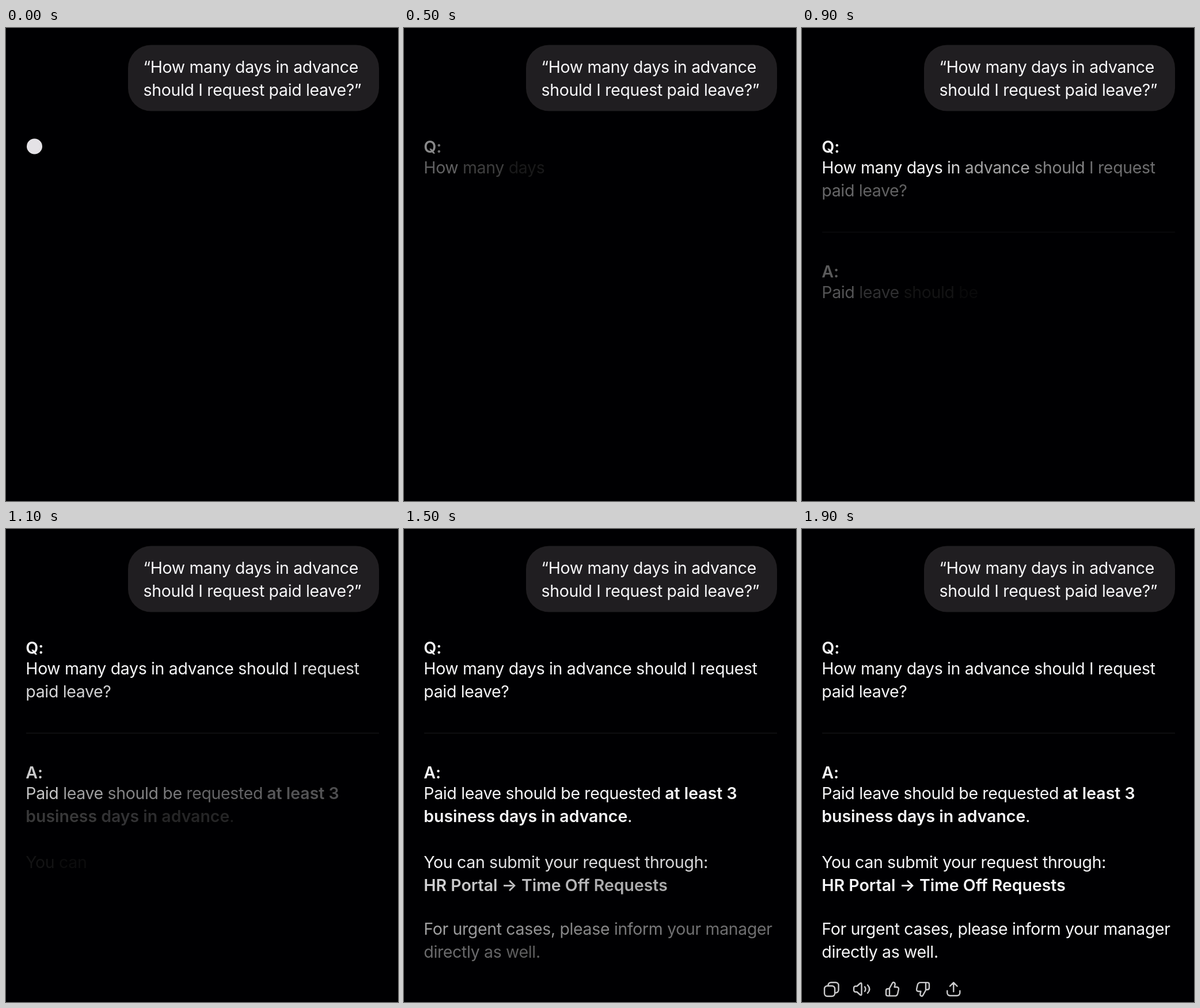
An HTML page that plays this animation: 681x823 px, repeating every 2000 ms.

```html
<!DOCTYPE html>
<html lang="en">
<head>
<meta charset="utf-8">
<title>Paid leave answer</title>
<style>
  html, body { margin: 0; width: 100%; height: 100%; overflow: hidden; background: #000002; }
  svg { display: block; }
  text {
    font: 400 28.5px Inter, "Liberation Sans", sans-serif;
    font-optical-sizing: none;
    letter-spacing: -0.35px;
    white-space: pre;
    fill: #f6f6f8;
  }
  .bold { font-weight: 600; letter-spacing: -0.03px; }
  .icon { fill: none; stroke: #cbcbcd; stroke-width: 2.4; stroke-linecap: round; stroke-linejoin: round; }
</style>
</head>
<body>
<svg id="stage" width="681" height="823" viewBox="0 0 681 823">
  <rect x="212" y="29.5" width="436" height="115" rx="40" fill="#201e21"/>
  <text x="238.5" y="77.5">“How many days in advance</text>
  <text x="238.5" y="117.5">should I request paid leave?”</text>
  <circle id="dot" cx="49.5" cy="206" r="13.5" fill="#e4e2e6"/>
  <rect id="divider" x="35" y="354.5" width="613" height="1.5" fill="#121214"/>
  <g id="answer"></g>
  <g class="icon">
    <rect x="39" y="795" width="18" height="18" rx="5"/>
    <path d="M45.5 795v-1a5 5 0 0 1 5-5h8a5 5 0 0 1 5 5v8a5 5 0 0 1-5 5h-1"/>
  </g>
  <g class="icon">
    <path d="M101 790.5L95.5 795.5H93a3 3 0 0 0-3 3v4a3 3 0 0 0 3 3h2.5l5.5 5q2.5 1.5 2.5-1.5v-17q0-3-2.5-1.5z"/>
    <path d="M109 796.5q3 4 0 8M114 793.5q6.5 7 0 14"/>
  </g>
  <g class="icon">
    <path id="thumb" d="M151.5 800L157 790q.8-1.8 2.6-1.2q2.6 1 2 4l-1 4.2h4q4 .3 3.2 4.4l-1.6 7q-1 4-5 4h-12q-3.2 0-3.2-3.2v-6q0-3.2 3.2-3.2zM152 800v12.4"/>
  </g>
  <g class="icon">
    <use href="#thumb" transform="translate(367 1601.5) rotate(180)"/>
  </g>
  <g class="icon">
    <path d="M252.3 803.5v3.5a5 5 0 0 0 5 5h12a5 5 0 0 0 5-5v-3.5M263.3 805V789.5M257 795.5l6.3-6.3l6.3 6.3"/>
  </g>
</svg>
<script>
const LOOP = 2000, STEP = 100, WORD_FADE = 440, ICON_FADE = 200;

// Baseline, words (* marks bold, _ joins to the previous word), fade start of each word in ms.
const lines = [
  [216.5, "*Q *_:", [255, 300]],
  [253, "How many days in advance should I request", [325, 390, 455, 515, 610, 665, 700, 705]],
  [293, "paid leave?", [715, 725]],
  [434, "*A:", [740]],
  [470, "Paid leave should be requested *at *least *3", [750, 815, 865, 885, 920, 945, 952, 960]],
  [510, "*business *days *in *advance _.", [1000, 1010, 1020, 1035, 1050]],
  [590, "You can submit your request through:", [1065, 1080, 1100, 1105, 1110, 1115]],
  [629.5, "*HR *Portal *→ *Time *Off *Requests", [1125, 1145, 1160, 1165, 1175, 1195]],
  [706, "For urgent cases, please inform your manager", [1212, 1225, 1240, 1258, 1285, 1300, 1304]],
  [746, "directly as well.", [1310, 1320, 1335]]
];

const svgEl = name => document.createElementNS("http://www.w3.org/2000/svg", name);
const answer = document.getElementById("answer");
const dot = document.getElementById("dot");
const fades = [{ el: document.getElementById("divider"), prop: "opacity", start: 735, length: 250 }];

for (const [y, copy, starts] of lines) {
  const row = svgEl("text");
  row.setAttribute("x", 34.3);
  row.setAttribute("y", y);
  copy.split(" ").forEach((token, i) => {
    const word = svgEl("tspan");
    const gap = i && !token.includes("_") ? " " : "";
    word.textContent = gap + token.replace(/[*_]/g, "");
    if (token[0] === "*") word.setAttribute("class", "bold");
    row.append(word);
    fades.push({ el: word, prop: "fill-opacity", start: starts[i], length: WORD_FADE });
  });
  answer.append(row);
}

document.querySelectorAll(".icon").forEach((el, i) =>
  fades.push({ el, prop: "opacity", start: 1580 + i * 30, length: ICON_FADE }));

function draw(time) {
  const t = Math.floor((time % LOOP) / STEP) * STEP;
  dot.setAttribute("r", t < 100 ? 13.5 : t < 200 ? 11 : 0);
  for (const { el, prop, start, length } of fades) {
    el.setAttribute(prop, Math.min(1, Math.max(0, (t - start) / length)));
  }
}

const origin = performance.now();
function tick() {
  draw(performance.now() - origin);
  requestAnimationFrame(tick);
}
tick();
</script>
</body>
</html>
```
